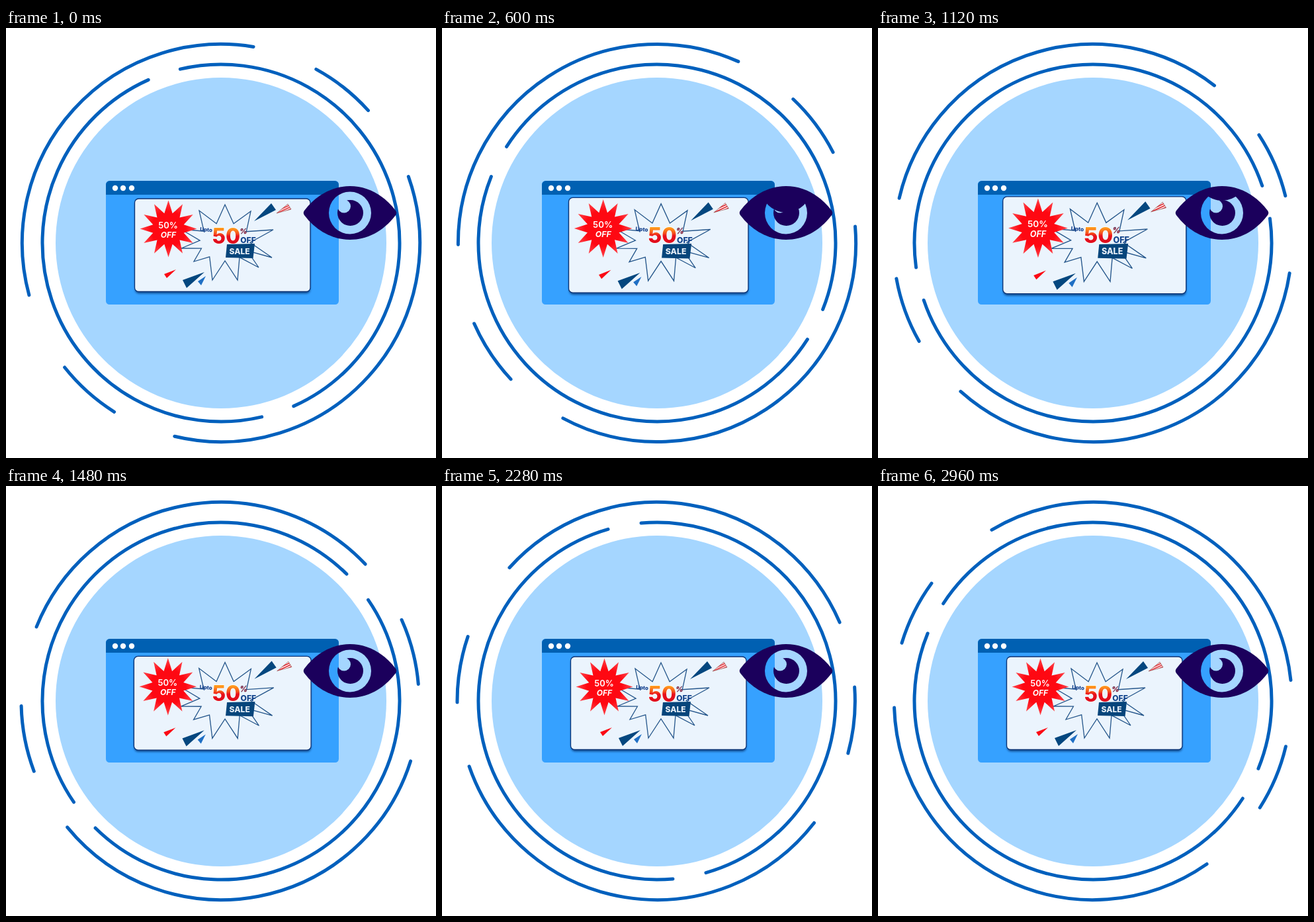
Animation, 650 px wide and 650 px high, one loop 3 s. Source, as an HTML page:

```html
<!DOCTYPE html>
<html lang="en">
<head>
<meta charset="utf-8">
<title>Sale preview</title>
<style>
  html, body { margin: 0; width: 100%; height: 100%; overflow: hidden; background: #fff; }
  svg { display: block; width: 100vw; height: 100vh; }
  text { font-family: Inter, "Open Sans", sans-serif; text-anchor: middle; font-weight: 800; }
</style>
</head>
<body>
<svg viewBox="0 0 650 650">
  <defs>
    <linearGradient id="fire" x1="0" y1="0" x2="0" y2="1">
      <stop offset=".22" stop-color="#ff9a1c"/>
      <stop offset=".42" stop-color="#f4501e"/>
      <stop offset=".52" stop-color="#e8101c"/>
      <stop offset="1" stop-color="#d80a1c"/>
    </linearGradient>
    <radialGradient id="flare" gradientUnits="userSpaceOnUse" cx="245.500" cy="303.500" r="44">
      <stop offset=".6" stop-color="#fe0812"/>
      <stop offset="1" stop-color="#ff4a50"/>
    </radialGradient>
    <pattern id="stripes" width="3" height="3" patternUnits="userSpaceOnUse" patternTransform="rotate(-25)">
      <rect width="3" height="3" fill="#fff"/>
      <rect width="3" height="1.600" fill="#e0242c"/>
    </pattern>
    <filter id="soft" x="-10%" y="-10%" width="120%" height="125%">
      <feGaussianBlur stdDeviation="1.600"/>
    </filter>
    <mask id="iris" maskUnits="userSpaceOnUse" x="440" y="230" width="160" height="100">
      <rect x="440" y="230" width="160" height="100" fill="#fff"/>
      <circle cx="520" cy="279.500" r="32"/>
      <circle cx="520.500" cy="279.500" r="19.500" fill="#fff"/>
      <circle cx="511" cy="269.500" r="10"/>
      <circle id="lid" cx="520" r="38" fill="#fff"/>
    </mask>
  </defs>

  <circle cx="325" cy="325" r="250" fill="#a5d6ff"/>
  <g fill="none" stroke="#0060bd" stroke-width="5" stroke-linecap="round">
    <path id="outer"/>
    <path id="inner"/>
  </g>

  <rect x="151" y="231" width="352" height="187" rx="5.500" fill="#36a1ff"/>
  <path d="M151 252V237a6 6 0 0 1 6-6H497a6 6 0 0 1 6 6V252Z" fill="#0060b2"/>
  <g fill="#fff">
    <circle cx="165" cy="242" r="4.200"/>
    <circle cx="177" cy="242" r="4.200"/>
    <circle cx="190" cy="242" r="4.200"/>
  </g>

  <g id="card">
    <rect x="195" y="261" width="265" height="140.500" rx="6" fill="#06285e" opacity=".65" filter="url(#soft)"/>
    <rect x="194.500" y="258" width="265.500" height="140.500" rx="6" fill="#ebf4fd" stroke="#0b3274" stroke-width="1.300"/>
    <path id="burst" fill="none" stroke="#24558a" stroke-width="1.300"/>
    <path id="badge" fill="url(#flare)"/>
    <g fill="#fff" font-size="13">
      <text x="245" y="302.500" style="font-weight:600">50%</text>
      <text x="245.500" y="316.500" font-size="12" font-style="italic" style="font-weight:700">OFF</text>
    </g>
    <path d="M401 265L408 275L375 292Z" fill="#04477f"/>
    <path d="M426 266L431 274L409 280Z" fill="url(#stripes)" stroke="#8c4a4a" stroke-width=".6"/>
    <path d="M267 381L273 393L300 369Z" fill="#04477f"/>
    <path d="M290 383L295 389L302 375Z" fill="#1f6fc4"/>
    <path d="M239 372L243 378L257 365Z" fill="#fb0a14"/>
    <text x="302.500" y="307.500" font-size="8" fill="#123f8c" transform="rotate(5 302 305)">Upto</text>
    <text x="333" y="325.500" font-size="32" fill="url(#fire)" stroke="#fff" stroke-width="1.500" paint-order="stroke">50</text>
    <text x="359" y="311" font-size="11" font-style="italic" fill="#c91f2a" stroke="#17386d" stroke-width=".3">%</text>
    <text x="366" y="325" font-size="12" fill="#12448c">OFF</text>
    <path d="M334 327L376 326L373.500 348L332 347Z" fill="#06457b"/>
    <text x="353" y="341.500" font-size="12" fill="#e6eef7">SALE</text>
  </g>

  <path d="M451 276C470 251 495 239 520 239S570 251 589 276Q591.500 279.500 589 283C570 308 545 320 520 320S470 308 451 283Q448.500 279.500 451 276Z" fill="#1b005c" mask="url(#iris)"/>
</svg>
<script>
  const LOOP = 3000, STEP = 40;
  const $ = id => document.getElementById(id);
  const polar = (cx, cy, rx, ry, deg) => {
    const a = deg * Math.PI / 180;
    return [cx + rx * Math.cos(a), cy + ry * Math.sin(a)];
  };
  const polygon = points => "M" + points.map(p => p.map(v => v.toFixed(1))).join("L") + "Z";

  const linear = u => u;
  const smooth = u => u * u * (3 - 2 * u);
  const track = (keys, ease) => t => {
    const i = keys.findIndex(k => k[0] > t);
    if (i < 0) return keys[keys.length - 1][1];
    if (i === 0) return keys[0][1];
    const [t0, v0] = keys[i - 1], [t1, v1] = keys[i];
    return v0 + (v1 - v0) * ease((t - t0) / (t1 - t0));
  };

  const spin = track([[0, 0], [600, 589], [1120, 1129], [1480, 1484], [1800, 1803], [2280, 2292], [3000, 3024]], linear);
  const zoom = track([[200, 1], [1000, 1.045], [1060, 1.045], [1640, 1]], smooth);
  const lidBottom = track([[350, 243], [850, 315], [1250, 243]], smooth);

  const arc = (radius, from, to) => {
    const [a, b] = [from, to].map(d => polar(325, 325, radius, radius, d));
    return `M${a}A${radius} ${radius} 0 ${to - from > 180 ? 1 : 0} 1 ${b}`;
  };

  // The two short outer arcs sit slightly off the long arcs' circle.
  $("outer").setAttribute("d", arc(300.6, 164.8, 279.4) + arc(299.4, 298.7, 318)
    + arc(300.6, 340.5, 463.5) + arc(302, 122.3, 141.5));
  $("inner").setAttribute("d", arc(270, 76.8, 246) + arc(270, 256.8, 426));

  const badge = Array.from({ length: 24 }, (_, i) => {
    const r = i % 2 ? 24 : 43;
    return polar(245.5, 303.5, r, r, -90 + i * 15);
  });
  $("badge").setAttribute("d", polygon(badge));

  const tips = [[331, 267], [370, 277], [404, 305], [402, 347], [382, 362],
    [350, 381], [312, 381], [284, 353], [265, 333], [264, 304], [292, 276]];
  const angle = ([x, y]) => Math.atan2(y - 323, x - 331) * 180 / Math.PI;
  const burst = tips.flatMap((tip, i) => {
    const a = angle(tip), gap = (angle(tips[(i + 1) % tips.length]) - a + 360) % 360;
    return [tip, polar(331, 323, 38, 29, a + gap / 2)];
  });
  $("burst").setAttribute("d", polygon(burst));

  function draw(t) {
    const turn = spin(t);
    $("outer").setAttribute("transform", `rotate(${turn * 0.025} 325 325)`);
    $("inner").setAttribute("transform", `rotate(${-turn * 0.075} 325 325)`);
    $("card").setAttribute("transform", `translate(327 328) scale(${zoom(t)}) translate(-327 -328)`);
    $("lid").setAttribute("cy", lidBottom(t) - 38);
  }

  const start = performance.now();
  function tick() {
    const t = (performance.now() - start) % LOOP;
    draw(Math.floor(t / STEP) * STEP);
    requestAnimationFrame(tick);
  }
  draw(0);
  requestAnimationFrame(tick);
</script>
</body>
</html>
```
